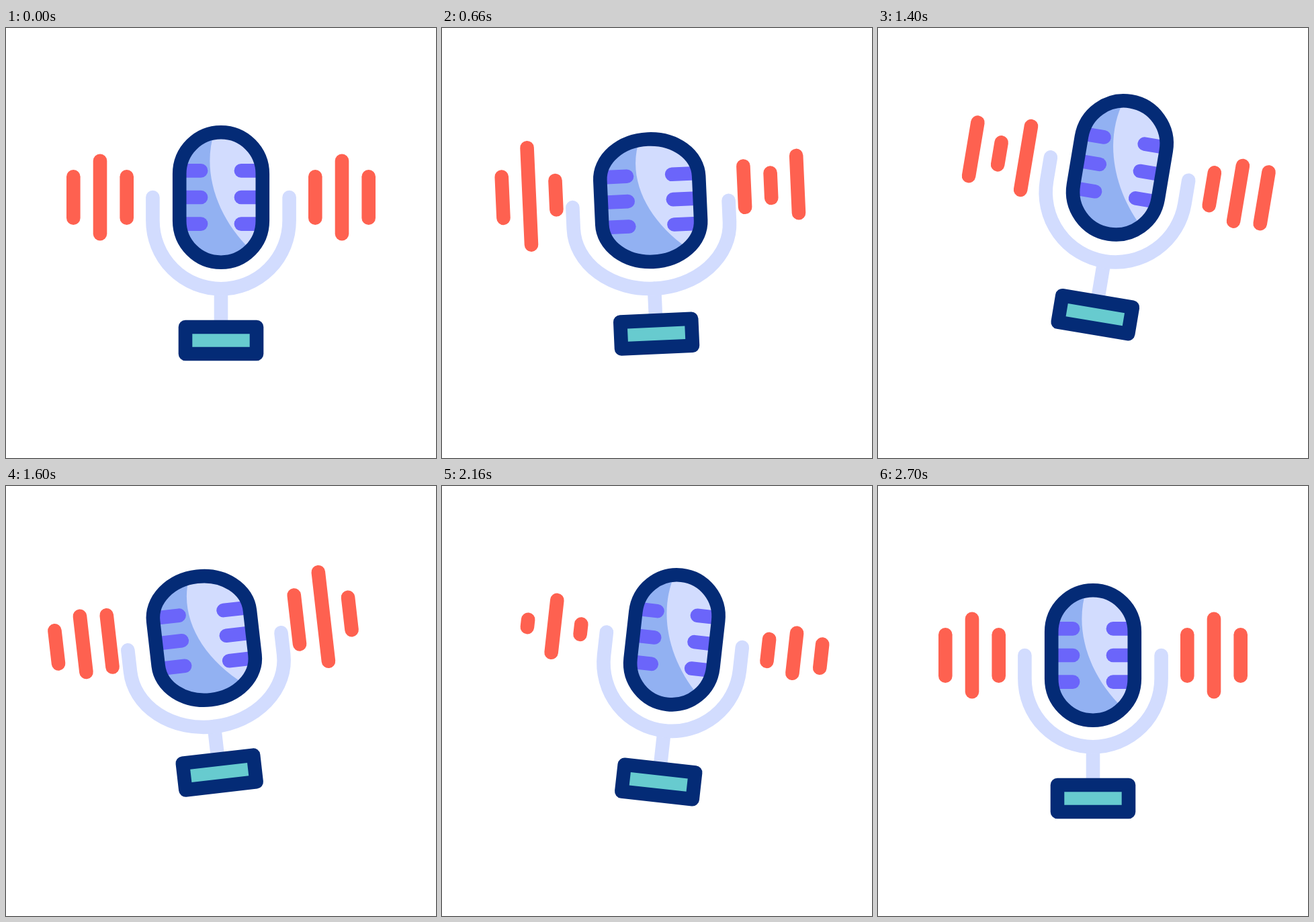
Recreate the animation shown at these times as an HTML page with a canvas. Size 640 px wide and 640 px high, loop 3 s.

```html
<!DOCTYPE html>
<html>
<head>
<meta charset="utf-8">
<style>
  html, body { margin: 0; overflow: hidden; background: #fff; }
  canvas { display: block; }
</style>
</head>
<body>
<canvas width="640" height="640"></canvas>
<script>
const ctx = document.querySelector('canvas').getContext('2d');
const LOOP = 3000, STROKE = 20.6, HEAD_Y = -233;
const NAVY = '#042b76', PALE = '#d2dcfe', BLUE = '#92b1f2',
      PURPLE = '#6b65fa', TEAL = '#67cbcf', CORAL = '#fe6150';

// Eased 0 to 1 between two times
function ramp(t, from, to) {
  const u = Math.min(1, Math.max(0, (t - from) / (to - from)));
  return u * u * (3 - 2 * u);
}

// Eased path through [time, value] points
const follow = (t, points) => points.reduce((value, [time, next], i) =>
  i ? value + (next - points[i - 1][1]) * ramp(t, points[i - 1][0], time) : next, 0);

// The mic rocks from side to side, one swing every 400 ms
const swings = [0, -7.2, 13.2, -10.1, 6.8, 0].map((angle, i) => [500 + 400 * i, angle]);
const tilt = t => follow(t, swings) * Math.PI / 180;

// Crouch, jump, settle
const drop = t => 26 * ramp(t, 0, 500) - 64.6 * ramp(t, 500, 800) + 38.6 * ramp(t, 1860, 2600);

// The head widens twice; while it is stretched, widening also flattens it
const spread = t => 15.6 * (ramp(t, 0, 600) - ramp(t, 600, 1000)
  + ramp(t, 1300, 1700) - ramp(t, 1700, 2100));
const stretch = t => 13.5 * (ramp(t, 0, 600) - ramp(t, 1700, 2100)) - 1.9 * spread(t);

// Both groups of bars pulse alike, the left one 200 ms later
const LAG = 200;
const bars = [
  { rest: 41, beats: [[860, 41], [1060, 60], [1400, 35], [1600, 47], [1960, 16]] },
  { rest: 64.5, beats: [[440, 84], [660, 29], [1200, 27], [1600, 77], [2140, 40]] },
  { rest: 41, beats: [[460, 32], [660, 53], [860, 34], [1140, 59], [1960, 18]] }
].map(({ rest, beats }) => [[0, rest], ...beats, [2400, rest]]);

function line(color, x1, y1, x2, y2) {
  ctx.strokeStyle = color;
  ctx.beginPath();
  ctx.moveTo(x1, y1);
  ctx.lineTo(x2, y2);
  ctx.stroke();
}

function drawBars(t, center) {
  bars.forEach((points, i) => {
    const x = center + (i - 1) * 39.7;
    const reach = follow(t, points) - STROKE / 2;
    line(CORAL, x, HEAD_Y - reach, x, HEAD_Y + reach);
  });
}

function drawStand(wide, lift) {
  const endY = HEAD_Y - 0.93 * lift + 0.43 * wide;
  const bottom = -96.7 - 0.5 * lift + 0.15 * wide;
  const rx = 101.6 + wide, ry = 101.6 * (bottom - endY) / 136.3;
  line(PALE, 0, bottom, 0, -45);
  ctx.beginPath();
  ctx.moveTo(rx, endY);
  ctx.ellipse(0, bottom - ry, rx, ry, 0, 0, Math.PI);
  ctx.lineTo(-rx, endY);
  ctx.stroke();
}

function drawBase() {
  ctx.beginPath();
  ctx.rect(-53, -40, 106, 40);
  ctx.fillStyle = TEAL;
  ctx.fill();
  ctx.strokeStyle = NAVY;
  ctx.stroke();
}

function drawHead(wide, lift) {
  const w = 61.8 + 0.8 * wide, h = 96.7 + 0.38 * lift;
  const sx = w / 61.8, sy = h / 96.7;
  const capsule = new Path2D();
  capsule.roundRect(-w, -h, 2 * w, 2 * h, { x: w, y: 61.8 * sy });

  ctx.save();
  ctx.translate(0, HEAD_Y - lift);
  ctx.save();
  ctx.clip(capsule);
  ctx.fillStyle = BLUE;
  ctx.fillRect(-w, -h, 2 * w, 2 * h);

  ctx.save();
  ctx.scale(sx, sy);
  ctx.fillStyle = PALE;
  ctx.beginPath();
  ctx.moveTo(-9, -100);
  ctx.bezierCurveTo(-30, -40, -6, 30, 44, 78);
  ctx.lineTo(100, 78);
  ctx.lineTo(100, -100);
  ctx.fill();
  ctx.restore();

  for (const y of [-39.6, 0, 39.6])
    for (const side of [-1, 1])
      line(PURPLE, side * w, y * sy, side * (19.6 * sx + 10.3), y * sy);
  ctx.restore();

  ctx.strokeStyle = NAVY;
  ctx.stroke(capsule);
  ctx.restore();
}

function draw(t) {
  const wide = spread(t), lift = stretch(t);
  ctx.setTransform(1, 0, 0, 1, 0, 0);
  ctx.clearRect(0, 0, 640, 640);
  ctx.translate(320, 485 + drop(t));
  ctx.rotate(tilt(t));
  ctx.lineWidth = STROKE;
  ctx.lineCap = ctx.lineJoin = 'round';

  drawBars(t - LAG, -180);
  drawBars(t, 180);
  drawStand(wide, lift);
  drawBase();
  drawHead(wide, lift);
}

function tick() {
  draw(performance.now() % LOOP);
  requestAnimationFrame(tick);
}
tick();
</script>
</body>
</html>
```
